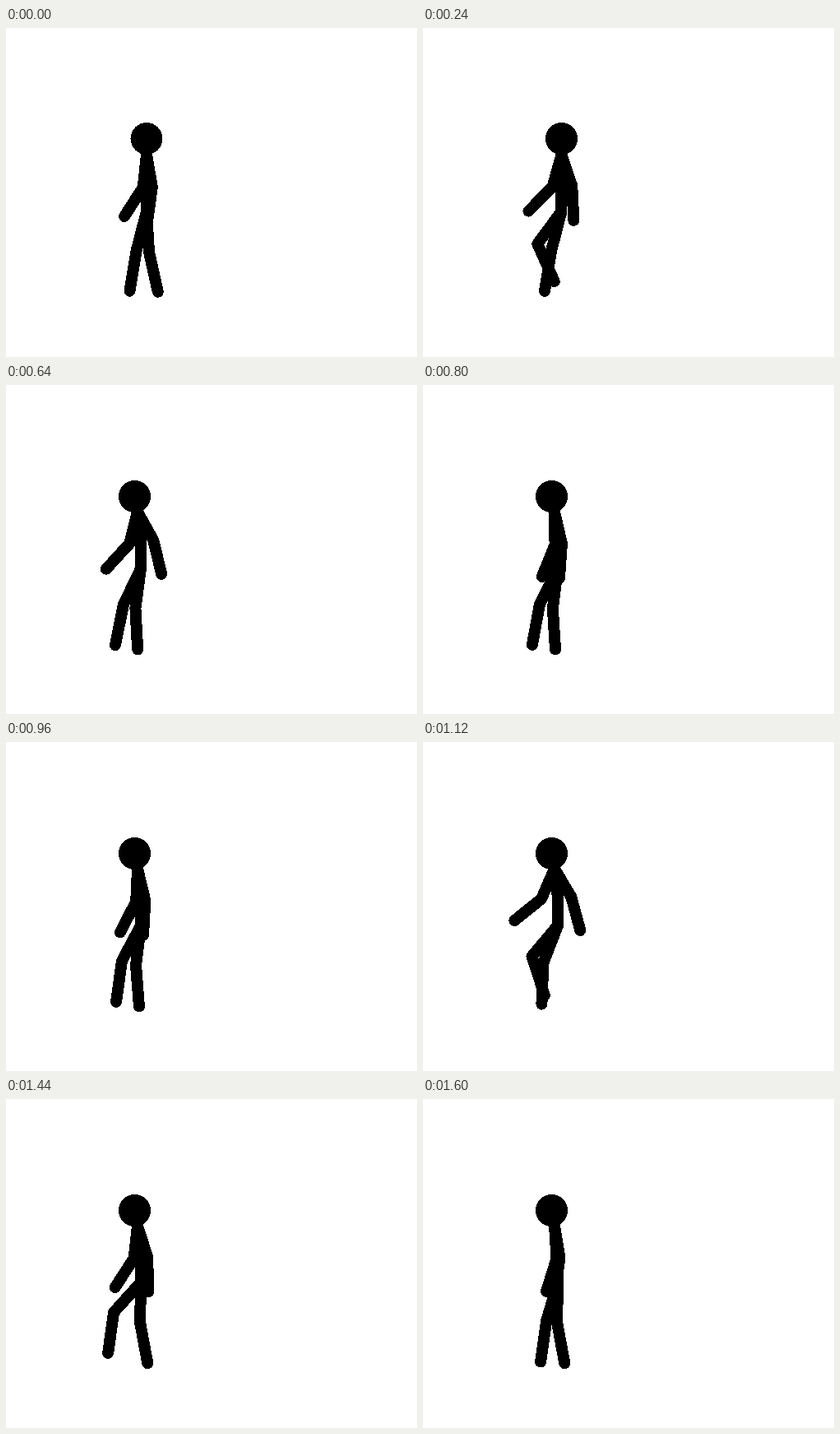
Recreate the animation shown at these times as an HTML page. Size 500 by 400 pixels, loop 1.68 s.

```html
<!DOCTYPE html>
<html lang="en">
<head>
<meta charset="utf-8">
<title>Walking figure</title>
<style>
html, body { margin: 0; width: 100%; height: 100%; overflow: hidden; background: #fff; }
svg { display: block; width: 500px; height: 400px; shape-rendering: crispEdges; }
path { fill: none; stroke: #000; stroke-width: 14; stroke-linecap: round; stroke-linejoin: round; }
</style>
</head>
<body>
<svg viewBox="0 0 500 400">
  <path id="body"/>
  <circle id="head" r="19.5"/>
</svg>
<script>
const STEP = 80, STEPS = 21;
const SHOULDER_Y = 154, WAIST_Y = 190, HIP_Y = 223;
const UPPER_ARM = 40, FOREARM = 42, THIGH = 49, SHIN = 50;

// Hand reach from the shoulder: step, x
const handA = [[0, -27], [3, -40], [5, -56], [12, 7], [15, 37], [20, -10]];
const handB = [[0, 1], [5, 24], [7, 33], [12, -21], [15, -55], [20, 0]];

// Leg swing: step, thigh and shin in degrees, positive = forward
const legA = [[3, 14.5, 9.5], [5, 9, -2], [12, 7, -4.5], [14, 40, -18], [17, 48, 8], [20, 16.5, 8]];
const legB = [[0, -3.5, -12.5], [3, 36.5, -24], [5, 49, -7], [8, 25.5, 11.5], [12, 28, 8], [17, 1, -10.5]];

const clamp = (v, lo, hi) => Math.min(hi, Math.max(lo, v));
const rad = deg => deg * Math.PI / 180;
const line = pts => "M" + pts.map(p => p.map(v => v.toFixed(2)).join(" ")).join("L");

// Smooth curve through the keys that never swings past them
function glide(keys, step, col = 1) {
  const last = keys.length - 1;
  const t = clamp(step, keys[0][0], keys[last][0]);
  const i = Math.max(1, keys.findIndex(k => k[0] >= t));
  const rate = j => (keys[j][col] - keys[j - 1][col]) / (keys[j][0] - keys[j - 1][0]);
  const slope = j => {
    const a = rate(Math.max(1, j)), b = rate(Math.min(last, j + 1));
    return a * b <= 0 ? 0 : 2 * a * b / (a + b);
  };
  const a = keys[i - 1], b = keys[i], span = b[0] - a[0];
  const u = (t - a[0]) / span, v = 1 - u;
  return v * v * ((1 + 2 * u) * a[col] + u * span * slope(i - 1)) +
    u * u * ((1 + 2 * v) * b[col] - v * span * slope(i));
}

// The hand follows a shallow arc; the elbow bends backwards to fit
function arm(x, dx) {
  const dy = 81 - 0.007 * (dx - 2) ** 2;
  const d = Math.min(Math.hypot(dx, dy), UPPER_ARM + FOREARM);
  const bend = Math.acos((UPPER_ARM ** 2 + d * d - FOREARM ** 2) / (2 * UPPER_ARM * d));
  const a = Math.atan2(-dx, dy) - bend;
  const elbow = [x - UPPER_ARM * Math.sin(a), SHOULDER_Y + UPPER_ARM * Math.cos(a)];
  return line([[x, SHOULDER_Y], elbow, [x + dx, SHOULDER_Y + dy]]);
}

function leg(x, thigh, shin) {
  const kneeX = x - THIGH * Math.sin(thigh), kneeY = HIP_Y + THIGH * Math.cos(thigh);
  return line([[x, HIP_Y], [kneeX, kneeY], [kneeX - SHIN * Math.sin(shin), kneeY + SHIN * Math.cos(shin)]]);
}

const body = document.getElementById("body");
const head = document.getElementById("head");

function draw(ms) {
  const step = Math.floor(ms / STEP) % STEPS;
  // The figure drifts forward, then leans its head and shoulders
  const drift = clamp(step / 5, 0, 1) ** 2;
  const lean = clamp((step - 5) / 2, 0, 1);
  const hipX = 171 - 7 * drift;
  const shX = hipX - 4 * lean, headX = hipX - 7.5 * lean, headY = 134.5 + lean;

  body.setAttribute("d", [
    line([[headX, headY], [shX, SHOULDER_Y], [hipX, WAIST_Y], [hipX, HIP_Y]]),
    ...[handA, handB].map(k => arm(shX, glide(k, step))),
    ...[legA, legB].map(k => leg(hipX, rad(glide(k, step)), rad(glide(k, step, 2))))
  ].join(""));
  head.setAttribute("cx", headX);
  head.setAttribute("cy", headY);
}

const start = performance.now();
function tick() {
  draw(performance.now() - start);
  requestAnimationFrame(tick);
}
tick();
</script>
</body>
</html>
```
